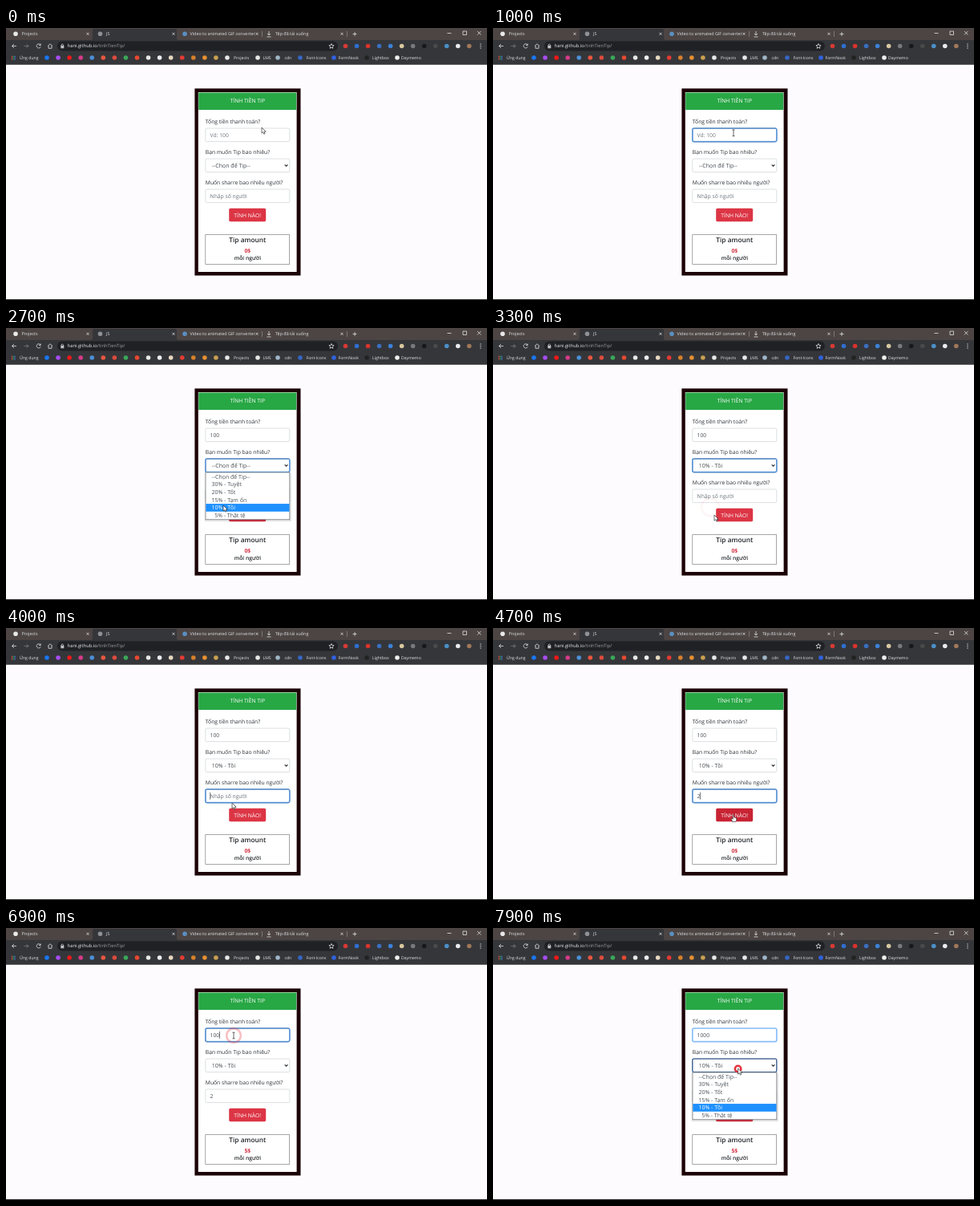
An HTML page for the animation above (8 s loop, 600 by 339 pixels).

```html
<!DOCTYPE html>
<html lang="vi">
<head>
<meta charset="utf-8">
<title>Tip</title>
<style>
html, body { margin: 0; width: 100%; height: 100%; overflow: hidden; background: #fdfbfe; }
svg { display: block; width: 600px; height: 339px; }
text { font-family: "Open Sans", "Noto Sans", sans-serif; font-size: 6.75px; fill: #2d3237; text-rendering: geometricPrecision; white-space: pre; }
.mid { text-anchor: middle; }
.tab { font-size: 5.4px; fill: #e2e3e5; }
.mark { font-size: 5.15px; fill: #e4e6e8; }
.url { font-size: 5.8px; fill: #9aa0a6; }
.url tspan { fill: #e8eaed; }
.value { fill: #495057; }
.option { font-size: 7px; fill: #495057; }
.white { fill: #fff; font-weight: 500; }
.bold { font-weight: 600; fill: #212529; }
.line { fill: none; stroke: #e0e1e4; stroke-width: .8; }
.field { fill: #fff; stroke: #c3c9cf; stroke-width: .6; }
.glow { fill: none; stroke: #68b0ff; stroke-opacity: .75; stroke-width: 1.7; }
.outline { fill: none; stroke: #14203c; stroke-width: 1.1; }
.ring { fill: none; stroke: #e2222c; stroke-width: 2.6; }
</style>
</head>
<body>
<svg viewBox="0 0 600 339">
  <rect width="600" height="339" fill="#fdfbfe"/>
  <rect y="338" width="600" height="1" fill="#2a2a2a"/>

  <g id="browser">
    <rect width="600" height="16" fill="#4c4544"/>
    <path d="M106 15q2 0 2-2V3q0-2 2-2H211q2 0 2 2V13q0 2 2 2z" fill="#35363a"/>
    <rect y="15" width="600" height="30" fill="#35363a"/>
    <rect y="45" width="600" height="1" fill="#5f6063"/>
    <rect x="64" y="16.5" width="350" height="12" rx="6" fill="#202124"/>
    <text class="tab" x="19.5" y="9.4">Projects</text>
    <text class="tab" x="125" y="9.4">JS</text>
    <text class="tab" x="229.5" y="9.4">Video to animated GIF converter</text>
    <text class="tab" x="336" y="9.4">Tệp đã tải xuống</text>
    <path class="line" d="M319.5 4v7M425.5 4v7" stroke-opacity=".4"/>
    <path class="line" d="M432.5 7.5h5M435 5v5M328 4v5m-2-2l2 2 2-2M325.5 11h5"/>
    <path class="line" d="M550.5 6.5h5M570 4h4.5v4.5H570zM588 4l4.5 4.5m0-4.5L588 8.5"/>
    <path class="line" d="M13 22.5H7.5m2.5-2.5l-2.5 2.5 2.5 2.5M43 21a2.6 2.6 0 1 0 .2 2.4M43.2 19.5v2h-2M52 22.5l3-2.7 3 2.7M53 22v3.3h4V22"/>
    <path class="line" d="M22.5 22.5H28m-2.5-2.5l2.5 2.5-2.5 2.5" stroke-opacity=".4"/>
    <path d="M68.3 22h4v3.300h-4z" fill="#bdc1c6"/>
    <path class="line" d="M69 22v-1q1.300-2 2.600 0v1"/>
    <text class="url" x="76.6" y="24.4"><tspan>hani.github.io</tspan>/tinhTienTip/</text>
    <path class="line" d="M406 19.5l.9 2 2.2.2-1.7 1.5.5 2.2-1.9-1.200-1.900 1.200.5-2.200-1.700-1.500 2.200-.2z"/>
    <g fill="#d5d7da"><circle cx="592" cy="20" r=".7"/><circle cx="592" cy="22.5" r=".7"/><circle cx="592" cy="25" r=".7"/></g>
    <text class="mark" x="17" y="39">Ứng dụng</text>
    <text class="mark" x="284" y="39">Projects</text>
    <text class="mark" x="320.5" y="39">LMS</text>
    <text class="mark" x="347.5" y="39">cdn</text>
    <text class="mark" x="374.5" y="39">Font-Icons</text>
    <text class="mark" x="414.5" y="39">FormNook</text>
    <text class="mark" x="457" y="39">Lightbox</text>
    <text class="mark" x="493" y="39">Daymemo</text>
  </g>

  <rect x="235.4" y="75.4" width="132.1" height="233.1" fill="#1c0308"/>
  <rect x="239.8" y="80" width="122.8" height="224" fill="#fff"/>
  <rect x="240.200" y="80.500" width="122" height="21.500" fill="#28a745"/>
  <text class="mid white" x="301.3" y="93.3">TÍNH TIỀN TIP</text>
  <text x="248.8" y="118.7">Tổng tiền thanh toán?</text>
  <text x="248.8" y="156.7">Bạn muốn Tip bao nhiêu?</text>
  <text x="248.8" y="194.5">Muốn sharre bao nhiêu người?</text>

  <g id="fields"></g>
  <path d="M347.8 170.3l1.8 1.9 1.8-1.9" fill="none" stroke="#24282c" stroke-width="1.2"/>
  <rect id="caret" y="129" width=".6" height="9" fill="#212529"/>

  <rect id="btnGlow" x="277.3" y="224" width="47.4" height="18.3" rx="2.5" fill="#f0a9b0"/>
  <rect id="btn" x="278.2" y="224.8" width="46" height="16.5" rx="1.8"/>
  <text class="mid white" x="301.2" y="235.5">TÍNH NÀO!</text>

  <rect x="248.8" y="257.7" width="104.9" height="36.9" fill="#fff" stroke="#6c6c6c" stroke-width=".6"/>
  <text class="mid bold" x="301.3" y="266.5" style="font-size:8.3px">Tip amount</text>
  <rect id="mark" x="297" y="272" width="8.6" height="10" fill="#1e7fe0"/>
  <text id="sum" class="mid bold" x="301.3" y="279.6" style="font-weight:700"></text>
  <text class="mid bold" x="301.4" y="289.3">mỗi người</text>

  <g id="list">
    <rect x="247.8" y="180.5" width="108" height="60.5" fill="#000" opacity=".12"/>
    <rect x="249" y="180" width="104.8" height="58.7" fill="#fff" stroke="#70757a" stroke-width=".7"/>
    <rect id="pick" x="249.3" width="104.2" height="9.7" fill="#1e90ff"/>
  </g>

  <g id="rings"></g>
  <g id="pointer" stroke-linejoin="round">
    <path id="arrow" d="M0 0v7.2l1.7-1.5 1.1 2.5 1.3-.6-1.100-2.400h2.200z" fill="#fff" stroke="#222" stroke-width=".65"/>
    <path id="beam" d="M-1.5-3.8h3M-1.5 3.8h3M0-3.8v7.6" fill="none" stroke="#222" stroke-width=".7"/>
    <path id="hand" d="M-.7 0h1.4v3l3 .7v2.8L2.7 8.5H-1L-3 5l1-.7 1.3 1z" fill="#fff" stroke="#222" stroke-width=".6"/>
  </g>
</svg>
<script>
const LOOP = 8000, STEP = 100;
const $ = id => document.getElementById(id);
const show = (el, on) => el.setAttribute('visibility', on ? 'visible' : 'hidden');

function add(parent, tag, attrs, label) {
  const el = document.createElementNS('http://www.w3.org/2000/svg', tag);
  for (const k in attrs) el.setAttribute(k, attrs[k]);
  if (label) el.textContent = label;
  return parent.appendChild(el);
}

// Browser icons as plain dots
const dot = (x, y, fill) => add($('browser'), 'circle', { cx: x, cy: y, r: 2.8, fill });
const dotRow = (x, y, gap, colors) => colors.split(' ').forEach((c, i) => dot(x + i * gap, y, c));
dot(12, 7.3, '#e8e8e8');
dot(117.5, 7.3, '#8d9196');
dot(223, 7.3, '#5b8fc0');
for (const x of [102, 209, 313, 419])
  add($('browser'), 'path', { class: 'line', d: `M${x - 1.5} 5.8l3 3m0-3l-3 3` });
for (let i = 0; i < 9; i++)
  add($('browser'), 'rect', { x: 6.8 + i % 3 * 1.8, y: 34.8 + Math.floor(i / 3) * 1.8, width: 1.2, height: 1.2, fill: ['#ea4335', '#34a853', '#4285f4'][i % 3] });
dotRow(51, 37, 14.06, '#1877f2 #a64df0 #f01818 #d63a8a #4a90d8 #e9573f #dd4b3e #3aa757 #e8482e #e8e8e8 #f0f0f0 #e8d8c0 #e33b32 #d8802a #e89030 #caa050 #e8e8e8');
[[314, '#e8e8e8'], [339, '#9fb6c8'], [367, '#3567c4'], [409, '#2f62e0'], [450, '#222'], [488, '#f0f0f0']]
  .forEach(([x, c]) => dot(x, 37, c));
dotRow(423.5, 22.5, 14.03, '#d83a34 #2f6fd0 #d8342c #3a6fc0 #3b82d8 #d8c8a0 #77797c #18191b #4a4a4a #4a90c8 #e8eaed #a07858');

// Form fields: [start, end] spans hold the focus
const fields = [
  { y: 125, focus: [[500, 1930], [6650, 7830]] },
  { y: 163, focus: [[1930, 3550], [7830, 8000]] },
  { y: 201, focus: [[3550, 4750]] }
];
for (const f of fields) {
  const box = { x: 248.8, y: f.y, width: 105, height: 16.6, rx: 1.8 };
  const g = $('fields');
  add(g, 'rect', { ...box, class: 'field' });
  f.outline = add(g, 'rect', { ...box, class: 'outline' });
  f.glow = add(g, 'rect', { ...box, class: 'glow' });
  f.text = add(g, 'text', { x: f.y === 163 ? 256.8 : 254.6, y: f.y + 10.9, class: 'value' });
}
fields[1].text.setAttribute('class', 'option');

const choices = ['--Chọn để Tip--', '30% - Tuyệt', '20% - Tốt', '15% - Tạm ổn', '10% - Tồi', '  5% - Thật tệ'];
const ROW = 9.72, TOP = 180.2;
const options = choices.map((s, i) =>
  add($('list'), 'text', { x: 256.5, y: TOP + 7.4 + i * ROW, class: 'option' }, s));

const clicks = [[500, 300, 130.5], [1930, 296.3, 172], [2900, 271, 223], [3550, 272, 217],
  [4750, 300, 233], [5350, 296.5, 276], [6650, 284, 134], [7830, 305.6, 175.5]];
const rings = clicks.map(([, cx, cy]) => add($('rings'), 'circle', { cx, cy, class: 'ring' }));

// Pointer path: time, x, y
const path = [[0, 319, 124], [200, 319, 124], [450, 300, 130.5], [1450, 300, 131], [1900, 296, 172],
  [2150, 295, 174], [2700, 271, 221], [2950, 271, 223], [3300, 276, 233], [3500, 272, 217], [3750, 272, 217],
  [4000, 282, 218], [4300, 283, 218], [4700, 300, 233], [4950, 300, 234], [5300, 296.5, 276], [5400, 297, 276],
  [5600, 312, 277], [6050, 313, 280], [6500, 284, 134], [7150, 284, 134], [7550, 308, 185], [7800, 305.6, 175], [8000, 305.6, 175]];

function pointerAt(t) {
  const i = Math.max(1, path.findIndex(p => p[0] > t));
  const [t0, x0, y0] = path[i - 1], [t1, x1, y1] = path[i];
  const p = (t - t0) / (t1 - t0), e = p * p * (3 - 2 * p);
  return [x0 + (x1 - x0) * e, y0 + (y1 - y0) * e];
}

// Last entry whose time has come
const latest = (t, list) => list.filter(e => e[0] <= t).pop();
const typed = [
  [[0, ''], [1100, '1'], [1300, '10'], [1500, '100'], [7150, '1000']],
  [[0, choices[0]], [3000, choices[4]]],
  [[0, ''], [4300, '2']]
];
const hints = ['Vd: 100', '', 'Nhập số người'];
const clamp = v => Math.min(1, Math.max(0, v));
const inside = (x, y, l, t, r, b) => x >= l && x <= r && y >= t && y <= b;

function drawField(f, i, t) {
  const [since, value] = latest(t, typed[i]);
  f.text.textContent = value || hints[i];
  f.text.style.fill = value ? '#41474d' : '#6c757d';
  const span = f.focus.find(s => t >= s[0] && t < s[1]);
  const level = Math.max(...f.focus.map(([a, b]) => clamp((t - a) / 150) * clamp(1 - (t - b - 70) / 150)));
  show(f.outline, span);
  f.glow.setAttribute('opacity', level);
  if (!span || i === 1) return;
  const age = t - Math.max(since, span[0]);
  const width = value ? f.text.getComputedTextLength() : 0;
  $('caret').setAttribute('x', 254.5 + width);
  $('caret').setAttribute('y', f.y + 3.8);
  show($('caret'), age % 1000 < 500);
}

function draw(t) {
  const [x, y] = pointerAt(t);
  show($('caret'), false);
  fields.forEach((f, i) => drawField(f, i, t));

  const open = t >= 1950 && t < 3000 || t >= 7850;
  const row = y > TOP ? Math.min(5, Math.floor((y - TOP) / ROW)) : t > 4000 ? 4 : 0;
  $('list').style.display = open ? '' : 'none';
  $('pick').setAttribute('y', TOP + row * ROW);
  options.forEach((o, i) => o.style.fill = i === row ? '#fff' : '#495057');

  const onButton = !open && inside(x, y, 278, 225, 324, 241);
  $('btn').setAttribute('fill', onButton ? '#c82333' : '#dc3545');
  show($('btnGlow'), t >= 4750 && t < 5350);

  const marked = t >= 5400 && t < 6650;
  show($('mark'), marked);
  $('sum').textContent = t < 4850 ? '0$' : '5$';
  $('sum').style.fill = marked ? '#fff' : '#d42a3b';

  rings.forEach((r, i) => {
    const p = (t - clicks[i][0]) / 500;
    show(r, p >= 0 && p < 1);
    if (p < 0 || p >= 1) return;
    r.setAttribute('r', 1 + 10.5 * (1 - (1 - p) ** 2));
    r.setAttribute('opacity', Math.min(1, 1.25 * (1 - p) ** 2.1));
  });

  const onText = !open && (inside(x, y, 249, 125, 354, 141.6) || inside(x, y, 249, 201, 354, 217.6) || inside(x, y, 293, 272, 309, 282));
  $('pointer').setAttribute('transform', `translate(${x} ${y})`);
  show($('beam'), onText);
  show($('hand'), onButton);
  show($('arrow'), !onText && !onButton);
}

const start = performance.now();
function tick() {
  const t = (performance.now() - start) % LOOP;
  draw(Math.floor(t / STEP) * STEP);
  requestAnimationFrame(tick);
}
draw(0);
requestAnimationFrame(tick);
</script>
</body>
</html>
```
